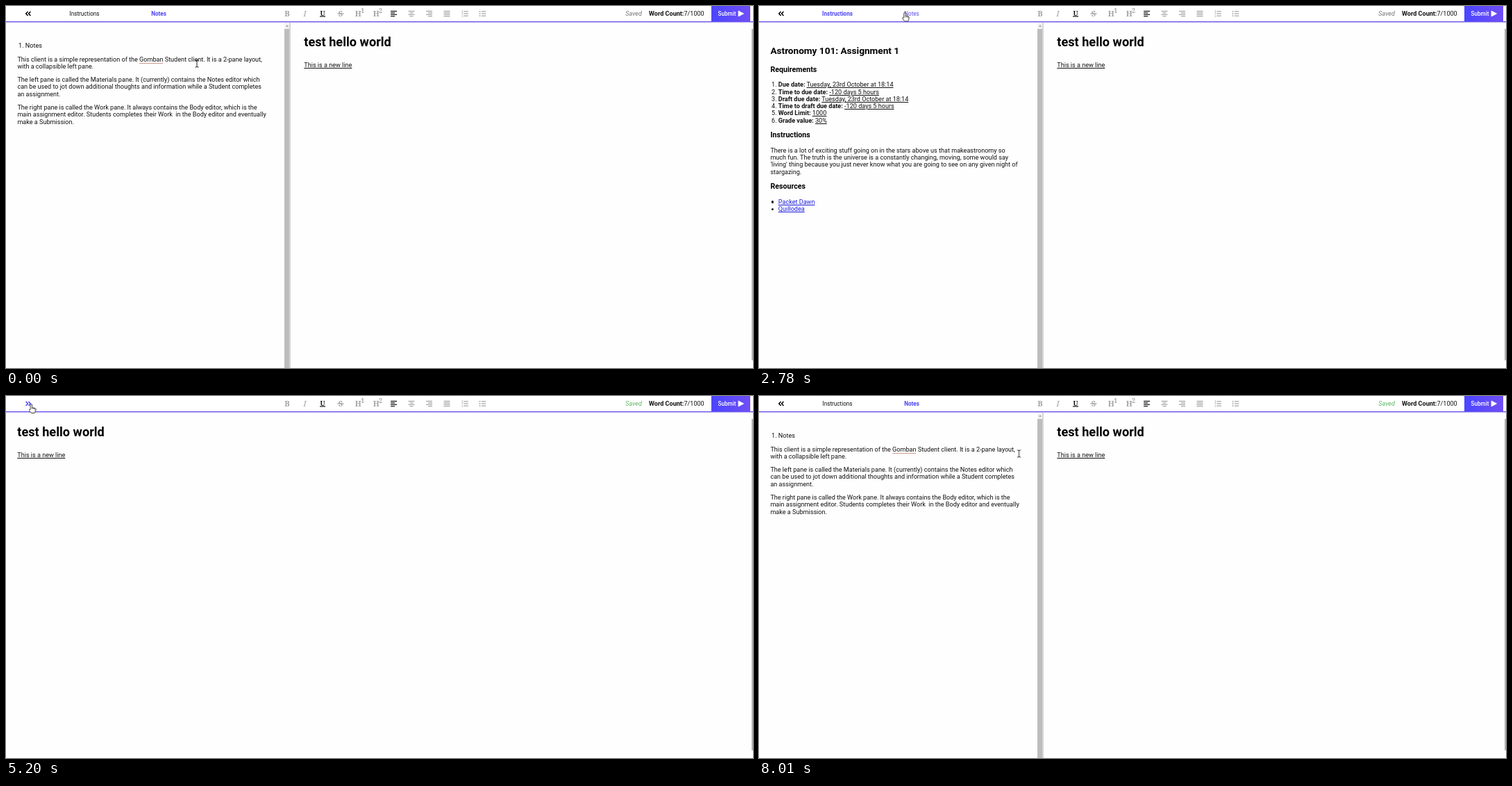
Recreate the animation shown at these times as an HTML page. Size 1076x521 px, loop 8.08 s.

```html
<!DOCTYPE html>
<html lang="en">
<head>
<meta charset="utf-8">
<title>Two pane editor</title>
<style>
html, body { margin: 0; width: 100%; height: 100%; overflow: hidden; background: #fefefe; }
body { position: relative; font: 9.08px/10.24px Roboto, sans-serif; color: #111; }
.abs, .abs > * { position: absolute; white-space: nowrap; }
#stage { position: absolute; left: 0; top: 0; width: 1076px; height: 521px; overflow: hidden; }

#work { left: 408px; top: 24px; width: 668px; height: 497px; background: #fefefe; }
#work .edge { left: 0; top: 0; width: 2px; height: 100%; background: #d5d5db; }
#work h1 { left: 21.3px; top: 17px; margin: 0; font: 700 18.15px/21px Roboto, sans-serif; color: #000; }
#work u { left: 21.3px; top: 56px; }
#caret { left: 22px; top: 75px; width: 1px; height: 11px; background: #000; }
#bar { left: 1074px; top: 33px; width: 2px; height: 477px; background: #b2b2b2; }

#pane { position: absolute; left: 0; top: 24px; height: 497px; overflow: hidden; background: #fefefe; }
.doc { position: absolute; left: 16.4px; width: calc(96% - 32.4px); }
.doc p, .doc ol, .doc ul { margin: 9.08px 0; padding: 0; }
.doc ol, .doc ul { padding-left: 11.4px; }
.doc ul { list-style: none; }
.doc ul li { position: relative; }
.doc ul li::before { content: ""; position: absolute; left: -9.6px; top: 3.6px; width: 3.2px; height: 3.2px; border-radius: 50%; background: #111; }
.doc h2 { margin: 0 0 13.2px; font: 700 13.6px/15.4px Roboto, sans-serif; color: #000; }
.doc h3 { margin: 10.5px 0; font: 700 10.65px/12px Roboto, sans-serif; color: #000; }
.doc a { color: #1c1ce0; text-decoration: underline; }
.typo { border-bottom: 1px solid #cf9a8c; }
#notes { top: 28.4px; }
#notes p, #notes ol { margin-top: 0; }
#tasks { top: 33.3px; }
#tasks ol, #tasks p, #tasks ul { margin: 10.5px 0; }
#track { position: absolute; right: 0; top: 0; width: 8px; height: 100%; background: #f2f2f2; }
#track::before { content: ""; position: absolute; left: 2px; top: 3px; border: 2px solid transparent; border-top-width: 0; border-bottom: 3px solid #a8a8a8; }
#track::after { content: ""; position: absolute; left: 0; top: 9px; width: 8px; bottom: 0; background: #bdbdbd; }

#head { left: 0; top: 0; width: 1076px; height: 22px; background: #fff; border-bottom: 1px solid #6a55ea; box-shadow: 0 1px #bcb2f3; }
.tab { top: 6px; width: 106px; text-align: center; font-size: 8.15px; }
.state { top: 6px; right: 160px; font-style: italic; }
#count { left: 926px; top: 6px; }
#submit { left: 1016px; top: 0; width: 56px; height: 22px; background: linear-gradient(90deg, #4a46ff, #704ef6); }
#submit span { position: absolute; left: 9.6px; top: 6px; font-size: 8.15px; font-weight: 500; color: #fff; }
svg { left: 0; top: 0; overflow: visible; }
#icons text { font-family: "Noto Serif", serif; font-weight: 700; text-anchor: middle; }
#arrow { transform-origin: 32px 11px; fill: none; stroke: currentColor; stroke-width: 1.5; }
</style>
</head>
<body>
<div id="stage">
  <div id="pane">
    <div class="doc" id="notes">
      <ol><li>Notes</li></ol>
      <p>This client is a simple representation of the <span class="typo">Gomban</span> Student client. It is a 2-pane layout, with a collapsible left pane.</p>
      <p>The left pane is called the Materials pane. It (currently) contains the Notes editor which can be used to jot down additional thoughts and information while a Student completes an assignment.</p>
      <p>The right pane is called the Work pane. It always contains the Body editor, which is the main assignment editor. Students completes their Work&nbsp; in the Body editor and eventually make a Submission.</p>
    </div>
    <div class="doc" id="tasks">
      <h2>Astronomy 101: Assignment 1</h2>
      <h3>Requirements</h3>
      <ol>
        <li><b>Due date:</b> <u>Tuesday, 23rd October at 18:14</u></li>
        <li><b>Time to due date:</b> <u>-120 days 5 hours</u></li>
        <li><b>Draft due date:</b> <u>Tuesday, 23rd October at 18:14</u></li>
        <li><b>Time to draft due date:</b> <u>-120 days 5 hours</u></li>
        <li><b>Word Limit:</b> <u>1000</u></li>
        <li><b>Grade value:</b> <u>30%</u></li>
      </ol>
      <h3>Instructions</h3>
      <p>There is a lot of exciting stuff going on in the stars above us that makeastronomy so much fun. The truth is the universe is a constantly changing, moving, some would say 'living' thing because you just never know what you are going to see on any given night of stargazing.</p>
      <h3>Resources</h3>
      <ul><li><a>Packet Dawn</a></li><li><a>Quillodea</a></li></ul>
    </div>
    <div id="track"></div>
  </div>

  <div class="abs" id="work">
    <div class="edge"></div>
    <h1>test hello world</h1>
    <u>This is a new line</u>
    <div id="caret"></div>
  </div>
  <div class="abs" id="bar"></div>

  <div class="abs" id="head">
    <svg width="60" height="22"><path id="arrow" d="M31.6 8l-2.9 3 2.9 3M35.4 8l-2.9 3 2.9 3"/></svg>
    <div class="tab" id="tabTasks" style="left:60px">Instructions</div>
    <div class="tab" id="tabNotes" style="left:167px">Notes</div>
    <svg id="icons" width="1076" height="22"></svg>
    <div class="state" id="saved">Saved</div>
    <div class="state" id="saving" style="color:#757575">Saving...</div>
    <div id="count"><b>Word Count:</b>7/1000</div>
    <div id="submit"><span>Submit</span>
      <svg width="56" height="22"><path d="M39 7l7.6 4-7.6 4z" fill="#fff" stroke="#fff" stroke-width=".8" stroke-linejoin="round"/></svg>
    </div>
  </div>

  <div class="abs" id="cursor" style="left:0;top:0">
    <svg id="beam" width="1" height="1"><path d="M-2.5-5h1.5l1 .8 1-.8h1.5M-2.5 5h1.5l1-.8 1 .8h1.5M0-4.2v8.4" fill="none" stroke="#222"/></svg>
    <svg id="hand" width="1" height="1"><path d="M-1.2 7.4V1.1a1.2 1.2 0 0 1 2.4 0V4.6l3.9.9q1 .3 1 1.4l-.5 3.4-.9 2.2H-.2L-3.5 8.3q.3-1.5 1.5-1z" fill="#fff" stroke="#222" stroke-width=".9" stroke-linejoin="round"/><path d="M1.2 4.8v2M3 5.2v1.8M4.7 5.6v1.6" stroke="#222" stroke-width=".7"/></svg>
  </div>
</div>

<script>
const LOOP = 8080;
const $ = id => document.getElementById(id);
const GREY = '#a2a2a2', BLACK = '#111', ACTIVE = '#4a43f5', HOVER = '#5b4de6';

// Toolbar icons
const glyph = (x, s, color = GREY, extra = '') =>
  `<text x="${x}" y="14.6" font-size="11" fill="${color}" ${extra}>${s}</text>`;
const line = (x, y, w, color, h = 1.2) =>
  `<rect x="${x}" y="${y}" width="${w}" height="${h}" fill="${color}"/>`;
const align = (cx, short, pos, color = GREY) =>
  [9, short, 9, short].map((w, i) => line(cx - 4.5 + (9 - w) * pos, 6.9 + i * 2.4, w, color)).join('');
const list = (cx, mark) =>
  [7.2, 10.4, 13.6].map((y, i) => line(cx - 1.6, y, 6.4, GREY) + mark(cx, y, i)).join('');
const heading = (x, n) => glyph(x - 1.8, 'H') +
  `<text x="${x + 4.6}" y="10" font-size="8.5" fill="${GREY}">${n}</text>`;

$('icons').innerHTML =
  glyph(405, 'B') +
  glyph(430.5, 'I', GREY, 'font-style="italic" style="font-weight:400"') +
  glyph(456, 'U', BLACK, 'style="font-size:9.5px" dy="-1"') + line(452, 14.4, 8, BLACK) +
  glyph(482, 'S') + line(477.3, 10.4, 9.4, GREY) +
  heading(509, 1) + heading(535, 2) +
  align(558.6, 6, 0, BLACK) + align(584, 5, .5) + align(609.5, 6, 1) + align(635, 9, 0) +
  list(661, (x, y, i) => `<text x="${x - 3.6}" y="${y + 2}" font-size="3.8" fill="${GREY}">${i + 1}</text>`) +
  list(686.5, (x, y) => line(x - 4.8, y - .2, 1.7, GREY, 1.6));

// Each step is [time, value, easing]; without an easing the value holds
function run(id, prop, steps) {
  const frames = steps.map(([t, v, easing = 'step-end']) => ({ offset: t / LOOP, [prop]: v, easing }));
  frames.push({ ...frames[frames.length - 1], offset: 1 });
  $(id).animate(frames, { duration: LOOP, iterations: Infinity });
}

const toTasks = 1926, toNotes = 3454, fold = 4873, unfold = 6000, slide = 300;
const OPEN = '409px';

run('pane', 'width', [
  [0, OPEN],
  [toTasks, '0px', 'ease'], [toTasks + slide, OPEN],
  [toNotes, '0px', 'ease'], [toNotes + slide, OPEN],
  [fold, OPEN, 'ease'], [fold + slide, '0px'],
  [unfold, '0px', 'ease'], [unfold + slide, OPEN]
]);
const home = 'translateX(0px)', away = 'translateX(-413px)';
run('work', 'transform', [
  [0, home], [fold, home, 'ease'], [fold + slide, away],
  [unfold, away, 'ease'], [unfold + slide, home]
]);
run('notes', 'opacity', [[0, 1], [toTasks, 0], [toNotes, 1]]);
run('tasks', 'opacity', [[0, 0], [toTasks, 1], [toNotes, 0]]);

for (const id of ['tabTasks', 'tabNotes']) run(id, 'opacity', [[0, 1], [fold, 0], [unfold, 1]]);
run('tabTasks', 'fontWeight', [[0, 400], [toTasks, 700], [toNotes, 400]]);
run('tabNotes', 'fontWeight', [[0, 700], [toTasks, 400], [toNotes, 700]]);
run('tabTasks', 'color', [
  [0, BLACK], [820, HOVER], [toTasks, ACTIVE], [toNotes, BLACK],
  [3960, HOVER], [4440, BLACK], [6560, HOVER], [7020, BLACK]
]);
run('tabNotes', 'color', [[0, ACTIVE], [toTasks, BLACK], [2550, HOVER], [toNotes, ACTIVE]]);
run('arrow', 'color', [[0, '#000'], [4440, ACTIVE], [6560, '#000']]);
run('arrow', 'transform', [[0, 'scaleX(1)'], [fold, 'scaleX(-1)'], [unfold, 'scaleX(1)']]);

run('saved', 'color', [[0, '#757575'], [3140, 'transparent'], [3190, '#5cb860']]);
run('saving', 'opacity', [[0, 0], [3140, 1], [3190, 0]]);
run('caret', 'opacity', [[0, 0], [440, 1], [930, 0], [1460, 1], [1750, 0]]);

run('beam', 'opacity', [[0, 1], [820, 0], [7755, 1]]);
run('hand', 'opacity', [[0, 0], [820, 1], [7755, 0]]);
run('cursor', 'transform', [
  [0, 275, 83], [440, 275, 83], [930, 91, 7], [1050, 91, 7], [1110, 91, 11],
  [1330, 91, 11], [1500, 97, 10.5], [2260, 97, 10.5], [2550, 188, 12], [2780, 210, 9.5],
  [3760, 210, 9.5], [4140, 105, 14], [4400, 60, 15], [4640, 36.5, 12],
  [5990, 36.5, 12], [6060, 40.5, 12], [6400, 40.5, 12], [6780, 97, 19],
  [7190, 211, 9], [7280, 211, 9], [7340, 215, 9.5], [7640, 215, 9.5], [8010, 374.5, 83]
].map(([t, x, y]) => [t, `translate(${x}px, ${y}px)`, 'linear']));
</script>
</body>
</html>
```
